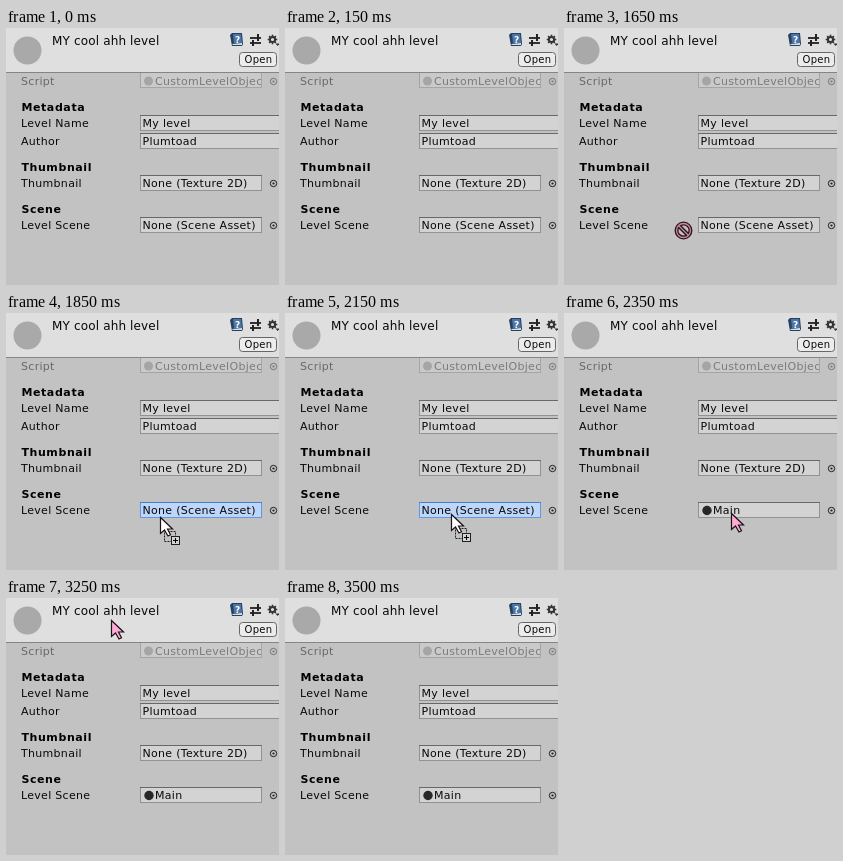
These frames come from a looping animation (273x257 px, 3700 ms). An HTML page with a canvas:

```html
<!DOCTYPE html>
<html lang="en">
<head>
<meta charset="utf-8">
<title>Inspector drag and drop</title>
<style>
  html, body { margin: 0; width: 100%; height: 100%; overflow: hidden; background: #c2c2c2; }
  canvas { display: block; width: 273px; height: 257px; }
</style>
</head>
<body>
<canvas id="stage" width="273" height="257"></canvas>
<script>
const ctx = document.getElementById('stage').getContext('2d');
const LOOP = 3700, STEP = 50, DROP = 2350;
const FONT = '"DejaVu Sans", sans-serif';

// Pointer path: time, x, y, kind. Each segment moves in 50 ms steps.
const path = [
  [100, 13, -13, 'arrow'], [150, 0, 0, ''],
  [1450, 16, 236, 'blocked'], [1550, 65, 215, 'blocked'], [1650, 119, 202, 'blocked'],
  [1700, 138, 201, 'drag'], [1750, 147, 203, 'drag'], [1850, 154, 204, 'drag'],
  [1900, 161, 204, 'drag'], [1950, 161, 204, 'drag'], [2200, 167, 200, 'drag'],
  [DROP, 167, 200, 'arrow'], [2700, 167, 200, 'arrow'],
  [2800, 164, 213, 'arrow'], [2900, 158, 225, 'arrow'], [2950, 157, 227, 'arrow'],
  [3000, 155, 218, 'arrow'], [3150, 119, 73, 'arrow'], [3200, 109, 34, 'arrow'],
  [3250, 105, 22, 'arrow'], [3300, 105, 22, 'arrow'],
  [3400, 104, 11, 'arrow'], [3450, 101, -6, 'arrow'], [3500, 0, 0, '']
];

function pointerAt(time) {
  const t = Math.floor(time / STEP) * STEP;
  const i = path.findLastIndex(p => p[0] <= t);
  if (i < 0 || !path[i][3]) return null;
  const [t0, x0, y0, kind] = path[i];
  const [t1, x1, y1] = path[i + 1];
  const k = (t - t0) / (t1 - t0);
  return { x: Math.round(x0 + (x1 - x0) * k), y: Math.round(y0 + (y1 - y0) * k), kind };
}

function rect(x, y, w, h, color) {
  ctx.fillStyle = color;
  ctx.fillRect(x, y, w, h);
}

function frame(x, y, w, h, color) {
  ctx.strokeStyle = color;
  ctx.lineWidth = 1;
  ctx.strokeRect(x + 0.5, y + 0.5, w - 1, h - 1);
}

function disc(x, y, r, color) {
  ctx.fillStyle = color;
  ctx.beginPath();
  ctx.arc(x, y, r, 0, Math.PI * 2);
  ctx.fill();
}

function ring(x, y, r, color, width) {
  ctx.strokeStyle = color;
  ctx.lineWidth = width;
  ctx.beginPath();
  ctx.arc(x, y, r, 0, Math.PI * 2);
  ctx.stroke();
}

function polyline(points, color, width) {
  ctx.strokeStyle = color;
  ctx.lineWidth = width;
  ctx.beginPath();
  points.forEach(([x, y]) => ctx.lineTo(x, y));
  ctx.stroke();
}

function polygon(points, color) {
  ctx.fillStyle = color;
  ctx.beginPath();
  points.forEach(([x, y]) => ctx.lineTo(x, y));
  ctx.fill();
}

function label(text, x, y, { size = 11, color = '#080808', weight = '', spacing = 0.3 } = {}) {
  ctx.font = `${weight} ${size}px ${FONT}`;
  ctx.letterSpacing = `${spacing}px`;
  ctx.fillStyle = color;
  ctx.fillText(text, x, y);
}

const heading = (text, y) => label(text, 15.4, y, { color: '#000', weight: 'bold', spacing: 0.6 });

function field(y, w, fill = '#d3d3d3', edge = '#929292', top = '#686868') {
  rect(134, y, w, 16, fill);
  frame(134, y, w, 16, edge);
  rect(134, y, w, 1, top);
}

function picker(y, color = '#202020') {
  ring(267.5, y + 0.5, 3.2, color, 1);
  disc(267.5, y + 0.5, 1.1, color);
}

function helpIcon() {
  polygon([[224, 7], [226, 5], [236, 5], [237, 16], [236, 18], [226, 18]], '#26405f');
  polygon([[226, 16], [236, 15], [236, 17], [227, 17]], '#d5dfe9');
  polygon([[227, 6], [235, 6], [236, 15], [228, 15]], '#4d76a8');
  label('?', 229, 14.5, { size: 9, color: '#fff', weight: 'bold' });
}

function slidersIcon() {
  rect(244, 9, 11, 2, '#333');
  rect(244, 14, 11, 2, '#333');
  rect(251, 6, 2, 7, '#222');
  rect(246, 12, 2, 6, '#222');
}

function gearIcon(x, y) {
  ring(x, y, 2.6, '#333', 2);
  for (let i = 0; i < 8; i++) {
    const a = i * Math.PI / 4, c = Math.cos(a), s = Math.sin(a);
    polyline([[x + 3 * c, y + 3 * s], [x + 4.8 * c, y + 4.8 * s]], '#333', 1.6);
  }
  polygon([[x + 3, y + 4], [x + 7, y + 4], [x + 5, y + 6.5]], '#333');
}

function openButton() {
  ctx.beginPath();
  ctx.roundRect(233.5, 24.5, 37, 14, 3);
  ctx.fillStyle = '#ececec';
  ctx.fill();
  ctx.strokeStyle = '#666';
  ctx.lineWidth = 1;
  ctx.stroke();
  label('Open', 238.5, 35, { size: 10 });
}

function header() {
  rect(0, 0, 273, 44, '#dfdfdf');
  rect(0, 44, 273, 1, '#858585');
  disc(21.5, 22.5, 14, '#a9a9a9');
  label('MY cool ahh level', 46, 17, { size: 12, spacing: 0.15 });
  helpIcon();
  slidersIcon();
  gearIcon(266.5, 11.5);
  openButton();
}

function scriptRow() {
  label('Script', 15, 57, { color: '#686868' });
  field(44, 122, '#cacaca', '#a5a5a5', '#999');
  disc(142.5, 53, 4.5, '#a5a5a5');
  ctx.save();
  ctx.beginPath();
  ctx.rect(135, 46, 120, 13);
  ctx.clip();
  label('CustomLevelObject', 149, 57, { color: '#7b7b7b' });
  ctx.restore();
  picker(53, '#767676');
}

function sceneField(filled, hover) {
  if (hover) field(189, 122, '#bdd6fa', '#6398e0', '#477fc9');
  else field(189, 122);
  if (filled) {
    disc(143, 197.5, 4.7, '#282828');
    label('Main', 149, 201);
  } else {
    label('None (Scene Asset)', 136.5, 201);
  }
  picker(197);
}

function arrow(x, y, fill) {
  const shape = [[0, 0], [0, 16], [4, 12.5], [7.5, 18.5], [10, 17.2], [7, 11.5], [12, 11.5]];
  ctx.beginPath();
  shape.forEach(([dx, dy]) => ctx.lineTo(x + 0.5 + dx, y + 0.5 + dy));
  ctx.closePath();
  ctx.fillStyle = fill;
  ctx.fill();
  ctx.strokeStyle = '#1b1018';
  ctx.lineWidth = 1.2;
  ctx.stroke();
}

function dragBadge(x, y) {
  ctx.setLineDash([2, 1]);
  frame(x + 4, y + 14, 12, 11, '#202020');
  ctx.setLineDash([]);
  rect(x + 11, y + 19, 9, 9, '#d4d4d4');
  frame(x + 11, y + 19, 9, 9, '#202020');
  rect(x + 13, y + 23, 5, 1, '#000');
  rect(x + 15, y + 21, 1, 5, '#000');
}

function blocked(x, y) {
  const slash = [[x - 5, y - 5], [x + 5, y + 5]];
  for (const [color, width] of [['#30141d', 4], ['#c58f9e', 1.3]]) {
    ring(x, y, 7, color, width);
    polyline(slash, color, width);
  }
}

function pointer(p) {
  if (p.kind === 'blocked') return blocked(p.x + 0.5, p.y + 0.5);
  if (p.kind === 'drag') dragBadge(p.x, p.y);
  arrow(p.x, p.y, p.kind === 'drag' ? '#fff' : '#ffacd5');
}

function draw(time) {
  const p = pointerAt(time);
  rect(0, 0, 273, 257, '#c2c2c2');
  scriptRow();
  header();

  heading('Metadata', 83);
  label('Level Name', 15, 99);
  field(87, 142);
  label('My level', 136.5, 99);
  label('Author', 15, 117);
  field(105, 142);
  label('Plumtoad', 136.5, 117);

  heading('Thumbnail', 143);
  label('Thumbnail', 15, 159);
  field(147, 122);
  label('None (Texture 2D)', 136.5, 159);
  picker(155);

  heading('Scene', 185);
  label('Level Scene', 15, 201);
  sceneField(time >= DROP, p?.kind === 'drag');
  if (p) pointer(p);
}

const start = performance.now();
function tick() {
  draw((performance.now() - start) % LOOP);
  requestAnimationFrame(tick);
}
tick();
</script>
</body>
</html>
```
